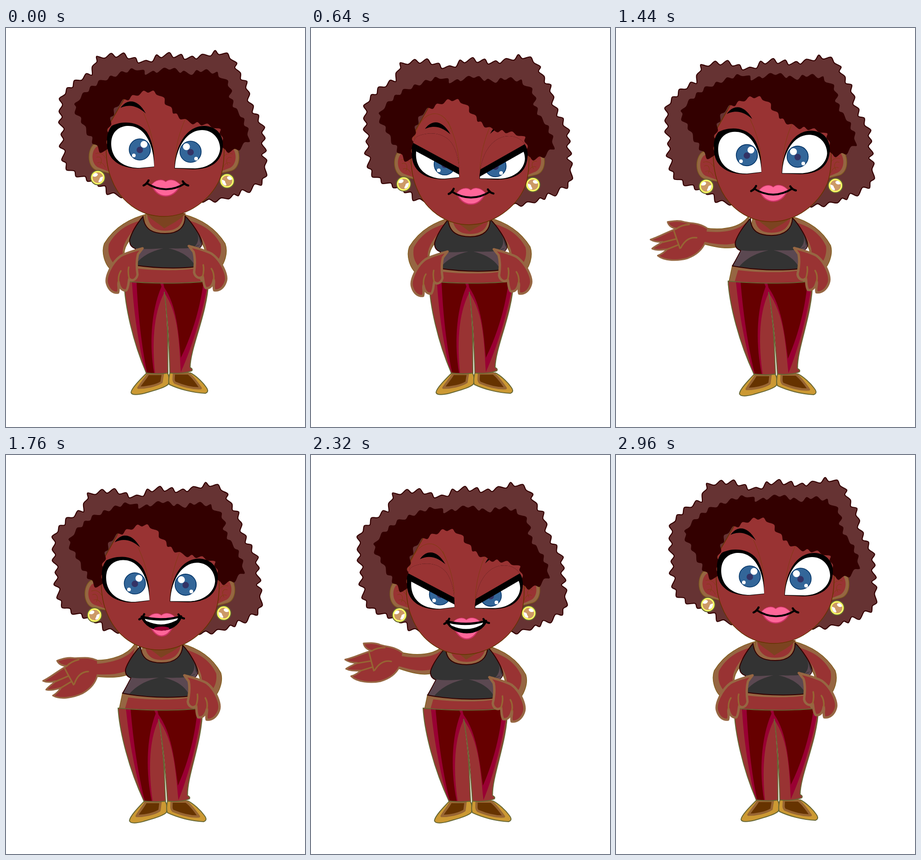
Animation of 648 by 864 pixels, one loop 3000 ms. Source, as an HTML page:

```html
<!DOCTYPE html>
<html lang="en">
<head>
<meta charset="utf-8">
<title>Talking woman</title>
<style>
html, body { margin: 0; width: 100%; height: 100%; overflow: hidden; background: #fff; }
svg { display: block; width: 648px; height: 864px; }
path, circle, ellipse { stroke-linejoin: round; }
.skin { fill: #933; }
.rim { fill: #966642; stroke: #806020; stroke-width: 1.5; }
.hand { fill: #933; stroke: #966642; stroke-width: 5; }
.fold { fill: none; stroke: #966633; stroke-width: 3.2; stroke-linecap: round; }
.hair { fill: #633; stroke: #300; stroke-width: 2.2; }
.bangs { fill: #300; }
.crimson { fill: #903; }
.maroon { fill: #600; }
.olive { fill: none; stroke: #663; stroke-width: 2; }
.shirt { fill: #333; stroke: #300; stroke-width: 2; }
.shade { fill: #5b4851; }
.shoe { fill: #c93; stroke: #663; stroke-width: 2; }
.insole { fill: #630; stroke: #963; stroke-width: 5; }
.iris { fill: #369; stroke: #036; stroke-width: 1.6; }
.pupil { fill: #336; }
.white { fill: #fff; }
.crease { fill: none; stroke: #833c14; stroke-width: 1; }
.ink { fill: none; stroke: #000; stroke-width: 4.5; stroke-linecap: round; }
.lip { fill: #f69; stroke: #c36; stroke-width: 2.5; }
</style>
</head>
<body>
<svg viewBox="0 0 648 864">
<defs>
  <path id="eyeL" d="M219 246C218 232 222 221 229 212C248 202 285 199 305 225C318 245 322 270 321 301L292 304C255 306 217 290 219 246Z"/>
  <path id="eyeR" d="M365 304C367 255 390 212 430 212C455 213 471 230 470 255C468 290 445 306 405 306Z"/>
  <path id="whiteL" d="M228 250C228 225 245 212 265 212C300 212 320 250 321 300L290 303C255 303 228 285 228 250Z"/>
  <path id="whiteR" d="M366 303C368 262 390 221 425 221C448 221 464 240 464 262C462 285 440 303 410 304Z"/>
  <clipPath id="inEyeL"><use href="#eyeL"/></clipPath>
  <clipPath id="inEyeR"><use href="#eyeR"/></clipPath>
  <clipPath id="inWhiteL"><use href="#whiteL"/></clipPath>
  <clipPath id="inWhiteR"><use href="#whiteR"/></clipPath>
  <g id="lid">
    <path class="skin" d="M205 100H335V294L205 222Z"/>
    <path d="M205 224L335 296" stroke="#000" stroke-width="13"/>
  </g>
  <g id="eyeball">
    <circle class="iris" r="23"/><circle class="pupil" cy="1" r="7"/>
  </g>
  <path id="brow" d="M248 173C262 153 285 152 303 185C285 169 268 164 248 173Z"/>
  <g id="ear">
    <path class="rim" d="M194 249C175 260 175 302 197 308L224 314V250Z"/>
    <path class="skin" d="M198 256C184 264 183 294 200 302L226 312V250Z"/>
    <path class="crease" d="M194 272C204 268 212 274 216 282M196 280C206 276 210 286 204 296M198 292C206 288 212 294 215 302"/>
  </g>
  <g id="ring">
    <circle r="15.5" fill="#ff6" stroke="#663" stroke-width="2"/>
    <circle r="11.5" fill="#c96"/>
    <path class="white" d="M-11 -3C-10 -11 -1 -12 0 -7C-1 -2 -7 -1 -11 -3ZM11 -3C12 5 7 11 2 10C0 7 4 5 4 2C5 -2 9 -1 11 -3Z"/>
  </g>
  <g id="upperArm">
    <path class="rim" d="M305 403C262 414 232 436 213 467C206 486 214 512 228 524L260 506C252 490 256 472 272 455L302 420Z"/>
    <path class="skin" d="M292 417C262 425 238 440 223 468C219 488 226 502 236 513L254 494C250 478 258 460 274 440Z"/>
  </g>
  <g id="restHand">
    <path class="hand" d="M296 477C280 482 262 486 248 494C229 508 214 540 219 554C223 567 232 575 243 573C246 563 242 558 244 550C246 563 252 570 261 568C266 560 265 552 267 543C274 550 283 544 285 534C283 520 282 505 286 490Z"/>
    <path class="fold" d="M244 550C243 540 245 532 249 526M267 543C265 534 264 526 266 518"/>
  </g>
  <path id="pants" d="M256 548C257 600 275 680 304 747C320 749 340 749 351 747C350 690 352 630 343 572C350 620 354 700 355 747C372 749 392 747 403 742C405 738 402 737 399 735C400 690 436 620 439 548C390 554 310 554 256 548Z"/>
</defs>

<g id="belly">
  <path class="rim" d="M265 510L411 514L435 552H259Z" stroke="none"/>
  <path class="skin" d="M278 520C320 526 380 526 409 521L426 556H270Z"/>
</g>

<g id="legs">
  <path class="shoe" d="M304 748C290 762 272 780 271 789C272 796 288 794 300 791C320 785 345 779 352 771C355 762 353 752 350 747Z"/>
  <path class="insole" d="M308 749C302 760 292 770 287 779C303 779 325 775 337 767L340 749Z"/>
  <path class="shoe" d="M355 747C352 760 352 768 354 772C375 782 405 790 432 791C440 788 437 782 434 778C425 765 410 752 400 747Z"/>
  <path class="insole" d="M364 748C363 760 362 764 366 768C385 776 405 781 422 780C414 768 405 755 395 748Z"/>
  <use href="#pants" class="skin"/>
  <path class="crimson" d="M273 549C277 620 288 690 303 747L323 747C317 690 318 620 343 573L340 552Z"/>
  <path class="maroon" d="M283 550C286 620 294 690 306 747L321 747C311 690 313 615 337 560L334 552Z"/>
  <path class="crimson" d="M338 552L438 549C428 610 404 690 379 745C375 690 376 618 342 572Z"/>
  <path class="maroon" d="M341 553L428 550C420 615 398 676 379 714C374 662 370 600 343 562Z"/>
  <path class="white" d="M345 590C350 640 351 700 351 747H354C355 690 352 640 345 590Z"/>
  <use href="#pants" class="olive"/>
</g>

<g id="reach">
  <path class="rim" d="M290 409C270 435 225 435 194 427L189 462C215 471 240 478 262 473L290 440Z"/>
  <path class="skin" d="M284 422C264 441 222 441 190 434V457C215 465 240 470 262 464Z"/>
  <path class="hand" style="stroke-width:3.4" d="M198 428C180 414 165 416 150 411C138 406 125 407 114 408C116 418 124 422 132 424C115 428 90 440 74 443C82 449 90 450 100 450C92 455 82 458 76 463C86 468 95 467 108 467C100 474 95 477 87 479C100 492 130 494 150 490C172 484 185 472 192 458"/>
  <path class="fold" d="M126 428C130 445 133 455 136 467M100 451L130 446M108 467L134 459M138 466C148 450 160 444 174 447M132 424C140 419 150 417 160 417"/>
</g>

<g id="torso">
  <use id="armL" href="#upperArm"/>
  <use href="#upperArm" transform="matrix(-1 0 0 1 688 0)"/>
  <path class="rim" d="M303 402L388 402L392 430L350 455L298 435Z" stroke="none"/>
  <path class="skin" d="M306 402H384C384 425 372 439 345 439C322 439 308 428 306 402Z"/>
  <path d="M303 401L390 401C375 418 358 424 343 434C330 422 315 416 303 401Z" fill="#7c4320"/>
  <path class="shirt" d="M297 408C300 438 320 445 345 445C375 445 389 430 388 407C402 420 424 452 425 466C424 476 416 479 408 482C412 500 410 508 411 517C370 522 310 520 265 511C272 498 276 488 281 478C272 475 267 468 268 458C272 444 283 425 297 408Z"/>
  <path class="shade" d="M282 477C300 480 325 478 341 477C312 484 294 495 280 512L267 510C273 498 277 488 282 477ZM424 462C422 474 405 479 352 477C382 484 400 497 410 515V482C417 479 426 474 424 462ZM414 440C418 455 418 464 408 474L422 468Z"/>
  <use id="handL" href="#restHand"/>
  <use href="#restHand" transform="matrix(-1.04 0 0 1 704 -5)"/>
</g>

<path id="mane" class="hair"/>
<g id="ears">
  <use href="#ear"/>
  <use href="#ear" transform="matrix(-1 0 0 1 685 1)"/>
  <use href="#ring" x="199" y="324"/>
  <use href="#ring" transform="matrix(-1 0 0 1 479 331)"/>
</g>
<g id="face">
  <path class="skin" d="M220 215C214 262 217 300 229 328C247 375 290 408 342 408C395 408 443 372 463 328C474 300 475 262 470 215L400 130H270Z" stroke="#630" stroke-width="1.5"/>
  <g id="brows"><use href="#brow"/><use href="#brow" transform="matrix(-1 0 0 1 692 0)"/></g>
  <path class="crease" d="M298 184C312 215 320 245 321 275M389 196C376 225 368 255 366 290"/>
  <path id="socket" class="crease" d="M224 222C238 156 288 150 304 200M269 256C285 245 302 250 312 268M374 268C385 250 402 246 416 256"/>
  <path id="bangs" class="bangs"/>
  <g id="eyes">
    <use href="#eyeL"/><use href="#eyeR"/>
    <use href="#whiteL" class="white"/><use href="#whiteR" class="white"/>
    <g clip-path="url(#inWhiteL)"><g class="look">
      <use href="#eyeball" x="290" y="263"/>
      <circle class="white" cx="299" cy="252" r="7.5"/><circle class="white" cx="277" cy="276" r="4"/>
    </g></g>
    <g clip-path="url(#inWhiteR)"><g class="look">
      <use href="#eyeball" x="400" y="268"/>
      <circle class="white" cx="391" cy="257" r="7.5"/><circle class="white" cx="412" cy="283" r="4"/>
    </g></g>
    <g clip-path="url(#inEyeL)"><use href="#lid" class="lid"/></g>
    <g clip-path="url(#inEyeR)"><g transform="matrix(-1 0 0 1 688 4)"><use href="#lid" class="lid"/></g></g>
  </g>
  <path id="lowLip" class="lip"/>
  <path class="lip" style="stroke-width:1.2" d="M315 340C324 328 338 326 346 333C355 326 368 328 378 340C362 353 332 353 315 340Z"/>
  <path id="gape" stroke="#000" stroke-width="4"/>
  <ellipse id="tongue" cx="346" cy="362" rx="17" ry="4.5" fill="#903"/>
  <path id="teeth" class="white"/>
  <path class="ink" d="M298 341C303 339 306 336 309 330M383 332C386 337 390 340 395 341"/>
</g>
</svg>
<script>
const $ = id => document.getElementById(id);
const LOOP = 3000, STEP = 40;
const MANE = "196,68 250,58 300,73 345,58 400,65 460,54 494,70 503,100 522,122 525,152 540,185 556,212 558,260 560,325 510,357 433,374 246,362 200,338 135,306 122,265 122,225 118,180 123,145 152,117 190,92";
const BANGS = "150,168 185,128 225,106 285,89 306,99 350,88 395,98 440,92 482,120 490,162 512,195 527,237 505,261 472,264 464,225 440,211 395,202 366,186 345,159 325,140 300,138 265,153 239,170 225,212 218,265 200,262 182,235 164,200";

// closed Catmull-Rom curve
function smooth(p) {
  const n = p.length;
  let d = "M" + p[0];
  for (let i = 0; i < n; i++) {
    const a = p[(i + n - 1) % n], b = p[i], c = p[(i + 1) % n], e = p[(i + 2) % n];
    const c1 = b.map((v, k) => v + (c[k] - a[k]) / 6);
    const c2 = c.map((v, k) => v - (e[k] - b[k]) / 6);
    d += `C${c1} ${c2} ${c}`;
  }
  return d + "Z";
}

// frizzy outline: alternate in and out along a smooth curve
function frizz(id, text, gap, depth, seed) {
  const path = $(id), points = [];
  const random = () => (seed = seed * 16807 % 2147483647) / 2147483647;
  path.setAttribute("d", smooth(text.split(" ").map(s => s.split(",").map(Number))));
  const length = path.getTotalLength(), n = 2 * Math.round(length / gap / 2);
  for (let i = 0; i < n; i++) {
    const s = (i + .5 + (random() - .5) * .5) * length / n;
    const a = path.getPointAtLength(s - 1), b = path.getPointAtLength(s + 1);
    const run = Math.hypot(b.x - a.x, b.y - a.y) || 1;
    const off = (i % 2 ? -1 : 1) * depth * (.4 + .6 * random());
    points.push([(a.x + b.x) / 2 + off * (b.y - a.y) / run, (a.y + b.y) / 2 - off * (b.x - a.x) / run]);
  }
  path.setAttribute("d", smooth(points));
}
frizz("mane", MANE, 13, 6, 7);
frizz("bangs", BANGS, 12, 4.5, 11);

function ramp(t, from, to) {
  const u = Math.min(1, Math.max(0, (t - from) / (to - from)));
  return u * u * (3 - 2 * u);
}
const bump = (t, mid, half) => Math.abs(t - mid) < half ? (1 + Math.cos(Math.PI * (t - mid) / half)) / 2 : 0;
const move = (id, text) => $(id).setAttribute("transform", text);
const slide = (name, y) => document.querySelectorAll(name).forEach(e => e.setAttribute("transform", `translate(0 ${y})`));
const show = (id, on) => $(id).style.display = on ? "" : "none";

// how far the mouth is open, in quarters, while she speaks
function speech(t) {
  if (t < 720 || t > 2640) return 0;
  return Math.round(2 + 2 * Math.cos(2 * Math.PI * (t - 1760) / 198.5)) / 4;
}

function drawMouth(open) {
  const parted = open > 0, top = parted ? 347 : 363, low = 353 + 21 * open;
  const lower = parted ? `C376 ${low} 318 ${low} 303 335Z` : "";
  $("gape").setAttribute("d", `M303 335Q346 ${top} 389 336${lower}`);
  $("gape").setAttribute("fill", parted ? "#000" : "none");
  $("lowLip").setAttribute("d", `M317 342C328 ${371 + 19 * open} 364 ${371 + 19 * open} 376 342Z`);
  $("teeth").setAttribute("d", `M310 340Q346 ${top + 2} 382 340Q380 345 376 346Q346 ${top + 13} 316 346Q312 345 310 340Z`);
  show("teeth", parted);
  show("tongue", open > .8);
}

function draw(t) {
  const lean = ramp(t, 680, 1000) - ramp(t, 2420, 2740);
  const settle = ramp(t, 380, 620) - ramp(t, 2480, 2900);
  const sway = ramp(t, 1040, 1760) - ramp(t, 2400, 2900);
  const hop = bump(t, 860, 160) + .4 * bump(t, 280, 160);
  const blink = bump(t, 650, 150) + bump(t, 2330, 150);
  const turn = -1.1 * settle - 1.2 * sway;
  const raise = ramp(t, 760, 940) - ramp(t, 2460, 2640);
  const reaching = t >= 760 && t < 2640;

  const torso = `matrix(1 0 ${-.07 * lean} 1 ${22.35 * lean + sway} ${3 * settle + 2 * sway + 4 * blink - 2 * hop})`;
  move("belly", torso);
  move("torso", torso);
  move("legs", `matrix(1 0 ${.04 * lean} ${1 + .012 * lean} ${-35 * lean} ${-6.6 * lean})`);
  move("reach", `translate(${14 - 14 * lean}) rotate(${70 * (raise - 1) - 14 * bump(t, 1760, 520)} 265 440)`);
  show("reach", reaching);
  show("armL", !reaching);
  show("handL", !reaching);

  move("mane", `translate(${-13 * sway} ${11 * settle + 4 * sway - 11 * hop}) rotate(${turn} 340 230)`);
  move("ears", `translate(${-11 * sway} ${11 * settle + 6 * sway - 11 * hop}) rotate(${turn} 340 230)`);
  move("face", `translate(${-10 * sway} ${8 * settle + 6 * sway + 10 * blink - 10 * hop}) rotate(${turn / 2} 343 300)`);
  slide("#brows", 27 * blink);
  slide("#eyes", 5 * blink);
  slide(".lid", 110 * (blink - 1));
  slide(".look", 9 * blink);
  $("socket").style.opacity = blink;
  drawMouth(speech(t));
}

const start = performance.now();
function tick() {
  const t = (performance.now() - start) % LOOP;
  draw(Math.floor(t / STEP) * STEP);
  requestAnimationFrame(tick);
}
draw(0);
requestAnimationFrame(tick);
</script>
</body>
</html>
```
